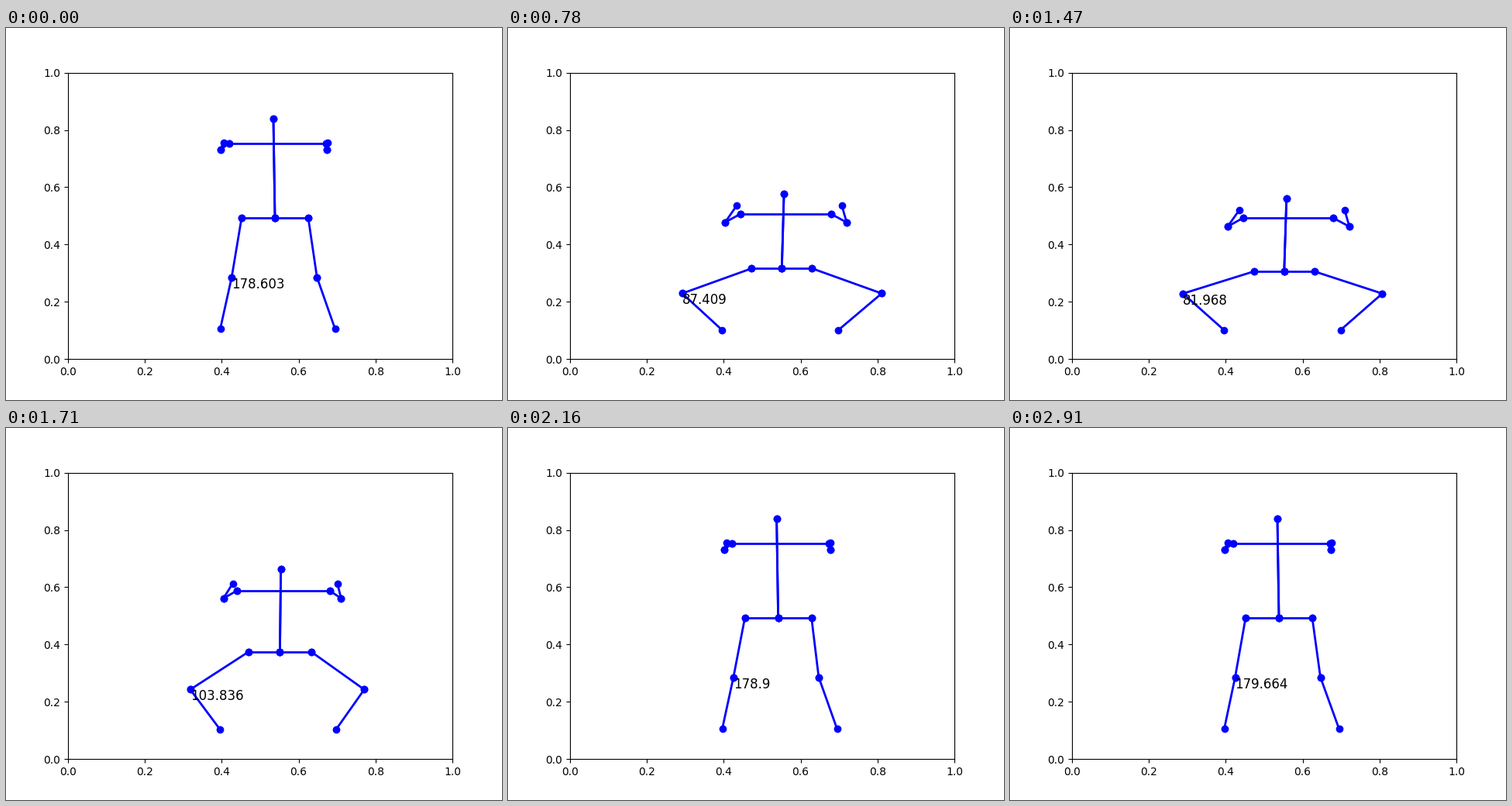
Animation, 640 px wide and 480 px high, one loop 2940 ms. Source, as a matplotlib script:

```python
import numpy as np
import matplotlib.pyplot as plt
from matplotlib.animation import FuncAnimation

FRAMES, STEP = 98, 30


def linear(u):
    return u


def speed_up(u):
    return u ** 1.8


def slow_down(u):
    return 1 - (1 - u) ** 1.8


# Frame, squat depth, knee angle, easing towards the next row
TIMELINE = [(0, 0, 178.603, speed_up),
            (15, 0.37, 121.801, slow_down),
            (39, 1, 70.34, speed_up),
            (57, 0.53, 103.836, linear),
            (64, 0.18, 140.507, slow_down),
            (72, 0, 178.9, linear),
            (82, 0, 179.298, linear),
            (97, 0, 179.664, linear)]

# Middle x, half width and y in pixels: standing, then in the deep squat
BODY = {
    "head": ((345, 0, 117), (359, 0, 240)),
    "shoulder": ((350, 62.5, 149), (360.5, 57.5, 264)),
    "elbow": ((345.5, 68.5, 157), (362, 78, 275.5)),
    "wrist": ((347.5, 67, 148), (367, 68, 256.5)),
    "hip": ((347, 43, 245), (355, 38, 327.5)),
    "knee": ((345.5, 55, 321.5), (353, 119, 341)),
    "ankle": ((350.5, 74, 388), (351.5, 75.5, 390)),
}
# Outward and downward bow of a joint halfway through the squat
BOW = {"knee": (29, 7), "elbow": (3, 0), "wrist": (0, -6)}

# The spine is stroked twice
LINKS = [("head", "pelvis")] * 2 + [("l_shoulder", "r_shoulder")]
for side in ("l_", "r_"):
    LINKS.append(("pelvis", side + "hip"))
    for a, b in (("shoulder", "elbow"), ("elbow", "wrist"),
                 ("hip", "knee"), ("knee", "ankle")):
        LINKS.append((side + a, side + b))


def timeline(frame):
    for (f0, d0, a0, ease), (f1, d1, a1, _) in zip(TIMELINE, TIMELINE[1:]):
        if frame <= f1:
            w = ease((frame - f0) / (f1 - f0))
            return d0 + (d1 - d0) * w, a0 + (a1 - a0) * w


def bump(frame, peak, width):
    return np.exp(-((frame - peak) / width) ** 2)


def pose(frame, depth):
    arch = np.sin(np.pi * depth) + 0.2 * np.sin(3 * np.pi * depth)
    sway = 6 * bump(frame, 64, 7)
    lean = {"ankle": 0,
            "knee": sway / 4 + 7 * bump(frame, 15, 10)}
    joints = {}
    for name, (stand, squat) in BODY.items():
        mid, half, y = np.array(stand) * (1 - depth) + np.array(squat) * depth
        out, down = BOW.get(name, (0, 0))
        mid += lean.get(name, sway)
        half += out * arch
        y += down * arch
        joints["l_" + name] = to_data(mid - half, y)
        joints["r_" + name] = to_data(mid + half, y)
    joints["head"] = joints["l_head"]
    joints["pelvis"] = (joints["l_hip"] + joints["r_hip"]) / 2
    return joints


def to_data(x, y):
    return np.array([(x - 80) / 496, (427.2 - y) / 369.6])


fig, ax = plt.subplots(figsize=(6.4, 4.8), dpi=100)
ax.set_xlim(0, 1)
ax.set_ylim(0, 1)
lines = [ax.plot([], [], "o-", color="blue", lw=2)[0] for _ in LINKS]
label = ax.text(0, 0, "", fontsize=12, va="top")


def draw(frame):
    depth, angle = timeline(frame)
    joints = pose(frame, depth)
    for line, (a, b) in zip(lines, LINKS):
        line.set_data(*zip(joints[a], joints[b]))
    label.set_position(joints["l_knee"])
    label.set_text(str(round(float(angle), 3)))
    return [*lines, label]


anim = FuncAnimation(fig, draw, frames=FRAMES, init_func=lambda: draw(0),
                     interval=STEP, repeat=True, repeat_delay=0)
plt.show()
```
